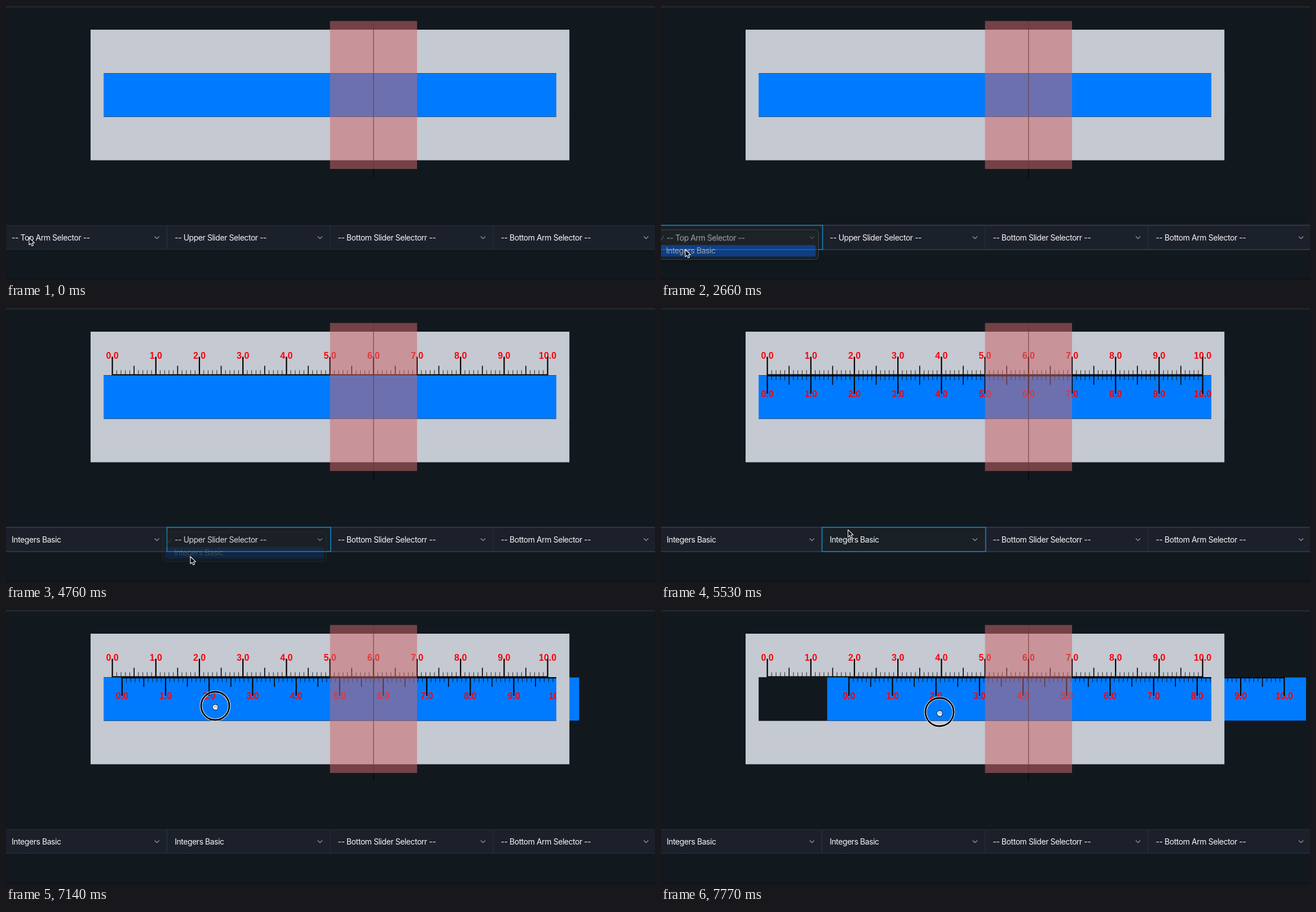
An HTML page that plays this animation: 1151 px wide and 486 px high, repeating every 8 s.

```html
<!DOCTYPE html>
<html lang="en">
<head>
<meta charset="utf-8">
<title>Slide rule</title>
<style>
  html, body { margin: 0; width: 100%; height: 100%; overflow: hidden; background: #11191f; }
  svg { display: block; width: 100%; height: 100%; }
  text { white-space: pre; }
  .ui { font: 14px Inter, "Open Sans", sans-serif; letter-spacing: -0.45px; fill: #f4f6f8; }
  .num { font: bold 16px "Liberation Sans", Arial, sans-serif; fill: #fb0008; text-anchor: middle; }
  .ring { fill: none; }
</style>
</head>
<body>
<svg id="stage" viewBox="0 0 1151 486" xmlns="http://www.w3.org/2000/svg"></svg>
<script>
const LOOP = 8000, STEP = 70, LAST = 7770;
const GREY = '#c5c9d1', BLUE = '#007bff';
const UNIT = 77.2, LEFT = 150, ZERO = LEFT + UNIT / 2, WIDE = UNIT * 11, CAP = UNIT * 0.3;
const COL = 289.2;
const PICK = 'Integers Basic';
const NAMES = ['-- Top Arm Selector --', '-- Upper Slider Selector --',
  '-- Bottom Slider Selectorr --', '-- Bottom Arm Selector --'];

// Times of each select's use, in ms
const USES = [
  { open: 1120, hover: 2100, close: 2590, pick: 2800, blur: 3640 },
  { open: 3640, hover: 4200, close: 4620, pick: 4830, blur: 6790 }
];
const CLICKS = [[1050, 1190], [2380, 2520], [3500, 3640], [4410, 4550], [6790, LOOP]];
const GRAB = 6790;

const POINTER = [
  [70, 41, 411], [210, 41, 413], [1960, 41, 414], [2170, 43, 432],
  [3080, 43, 432], [3290, 309, 423], [3500, 331, 414], [3990, 331, 414],
  [4270, 327, 437], [4480, 327, 437], [4760, 327, 441], [5180, 330, 400],
  [5600, 332, 392], [5810, 332, 392], [6650, 350, 165], [6860, 353, 167],
  [7140, 371, 170], [7350, 414, 173], [7560, 462, 178], [7770, 494, 181]
];
const SHIFT = [[6930, 0], [7140, 17.2], [7350, 62], [7560, 112], [7770, 144.7]];

const stage = document.getElementById('stage');

function add(parent, tag, attrs = {}, text) {
  const el = document.createElementNS('http://www.w3.org/2000/svg', tag);
  for (const k in attrs) el.setAttribute(k, attrs[k]);
  if (text) el.textContent = text;
  parent.appendChild(el);
  return el;
}
const box = (parent, x, y, width, height, fill, more) =>
  add(parent, 'rect', { x, y, width, height, fill, ...more });
const label = (parent, x, y, text, cls = 'ui') => add(parent, 'text', { x, y, class: cls }, text);
const group = parent => add(parent, 'g');
const clamp = v => Math.max(0, Math.min(1, v));
const show = (el, on) => el.setAttribute('opacity', +on);
const move = (el, x, y) => el.setAttribute('transform', `translate(${x} ${y})`);

// Values at time t on a list of [time, ...values]
function along(keys, t) {
  let i = keys.findIndex(k => k[0] > t);
  if (i < 0) i = keys.length;
  if (i === 0) return keys[0].slice(1);
  const a = keys[i - 1], b = keys[i] || a;
  const p = a === b ? 0 : (t - a[0]) / (b[0] - a[0]);
  return a.slice(1).map((v, n) => v + (b[n + 1] - v) * p);
}

// dir -1 draws ticks upwards, 1 downwards
function scale(parent, y, dir) {
  const g = group(parent);
  for (let i = 0; i <= 10; i++)
    label(g, ZERO + i * UNIT, dir < 0 ? 89.7 : 157.6, i.toFixed(1), 'num');
  const ticks = { 8: '', 16: '', 32: '' };
  for (let i = 0; i <= 100; i++) {
    const len = i % 10 === 0 ? 32 : i % 5 === 0 ? 16 : 8;
    ticks[len] += `M${ZERO + i * UNIT / 10} ${y}v${len * dir}`;
  }
  const width = { 8: 0.8, 16: 1.6, 32: 2.2 };
  for (const len in ticks)
    add(g, 'path', { d: ticks[len], stroke: '#000', 'stroke-width': width[len] });
  add(g, 'path', { d: `M${ZERO - 1} ${y}h${UNIT * 10 + 2}`, stroke: '#000', 'stroke-width': 2 });
  return g;
}

// Page
box(stage, 0, 0, 1151, 486, '#11191f');
box(stage, 0, 0, 1151, 3, '#20272a');
box(stage, 0, 482, 1151, 4, '#0f131b');

// Rule
box(stage, LEFT, 42, WIDE, UNIT, GREY);
box(stage, LEFT, 196.7, WIDE, UNIT - 0.3, GREY);
const topScale = scale(stage, 118.4, -1);
const slider = group(stage);
box(slider, LEFT, 119.7, WIDE, 76.4, BLUE);
const sliderScale = scale(slider, 120.2, 1);
for (const x of [LEFT, LEFT + WIDE - CAP]) box(stage, x, 118, CAP, 80, GREY);
const middle = ZERO + UNIT * 6;
add(stage, 'path', { d: `M${middle} 26.6V304.6`, stroke: '#000', 'stroke-width': 1 });
box(stage, middle - UNIT, 26.6, UNIT * 2, 262.5, '#cc6768', { 'fill-opacity': 0.53 });

// Selects
box(stage, 0, 389, 1151, 43, '#2a303d');
const edges = box(stage, -2, 388.7, 1156, 43.6, 'none', { stroke: '#30384a', 'stroke-width': 1.4 });
const selects = NAMES.map((name, i) => {
  const x = i * COL - 3.6;
  const g = group(stage);
  box(g, x + (i ? 0.5 : 0), 390, COL - 1, 41, '#1c202a');
  const focus = box(g, x, 389, COL + 1, 43, '#192026', { stroke: '#127cb4', 'stroke-width': 1.8, opacity: 0 });
  const text = label(g, 10 + i * COL, 415.8, name);
  add(g, 'path', { d: `M${263.6 + i * COL} 408.7l4 4 4-4`, fill: 'none', stroke: '#929aa6', 'stroke-width': 1.3 });
  return { g, focus, text, name };
});

// Menus
add(add(stage, 'filter', { id: 'soft', x: '-20%', y: '-50%', width: '140%', height: '200%' }),
  'feGaussianBlur', { stdDeviation: 5 });
const menus = USES.map((use, i) => {
  const g = group(stage), x = i * COL - 11.5;
  box(g, x, 400, 291, 54, '#000', { rx: 6, opacity: 0.4, filter: 'url(#soft)' });
  box(g, x, 397, 291, 52.6, '#202426', { rx: 6, stroke: '#5c6163', 'stroke-width': 1 });
  const hover = box(g, x + 5, 424, 281, 20.5, '#0b55c4', { rx: 4 });
  add(g, 'path', { d: `M${x + 8.5} 412.5l2.7 3.3 5-7.6`, fill: 'none', stroke: '#777b7d', 'stroke-width': 1.4 });
  label(g, x + 21, 416.6, NAMES[i]).style.fill = '#707476';
  label(g, x + 20.5, 438.8, PICK);
  return { g, hover };
});

// Pointer
const ring = group(stage);
add(ring, 'circle', { r: 25, class: 'ring', stroke: '#fff', 'stroke-width': 4.6 });
add(ring, 'circle', { r: 25, class: 'ring', stroke: '#000', 'stroke-width': 2.8 });
const arrow = add(stage, 'path', {
  d: 'M0 0V12.8L3 10.1 5 14.6 7.4 13.6 5.4 9.2H9.4Z',
  fill: '#000', stroke: '#fff', 'stroke-width': 1.1, 'stroke-linejoin': 'round'
});
const fist = group(stage);
add(fist, 'path', {
  d: 'M-4.6-1.2Q-4.6-3-3-2.6Q-2.4-4.6-.8-3.6Q.6-4.8 1.6-3.2Q3.2-4 3.8-2.2Q5.4-2 4.8.6Q4.4 3 3.2 5.6H-2.4Q-3 3.6-5 1.8Q-5.6.4-4.6-1.2Z',
  fill: '#fff', stroke: '#111', 'stroke-width': 1
});
add(fist, 'path', { d: 'M-1.6-1V1M.6-1V1M2.6-.8V1', stroke: '#111', 'stroke-width': 0.8 });

function draw(t) {
  let anyFocus = 0;
  USES.forEach((use, i) => {
    const { g, focus, text, name } = selects[i];
    const lit = clamp((t - use.open) / 280) - clamp((t - use.blur) / 280);
    show(focus, lit);
    // keep the focused border above its neighbours
    if (lit > 0.5) stage.insertBefore(g, menus[0].g);
    anyFocus = Math.max(anyFocus, lit);
    text.textContent = t < use.pick ? name : PICK;
    show(menus[i].g, t < use.open ? 0 : clamp(1 - (t - use.close) / 175));
    show(menus[i].hover, t >= use.hover);
  });
  show(edges, anyFocus);
  show(topScale, t >= USES[0].pick);
  show(sliderScale, t >= USES[1].pick);
  move(slider, along(SHIFT, t)[0], 0);

  const [x, y] = along(POINTER, t);
  move(arrow, x, y);
  move(fist, x + 0.3, y + 1.6);
  move(ring, x, y);
  show(arrow, t < GRAB);
  show(fist, t >= GRAB);
  show(ring, CLICKS.some(([from, to]) => t >= from && t < to));
}

const start = performance.now();
function tick() {
  const t = (performance.now() - start) % LOOP;
  draw(Math.min(LAST, Math.floor(t / STEP) * STEP));
  requestAnimationFrame(tick);
}
tick();
</script>
</body>
</html>
```
